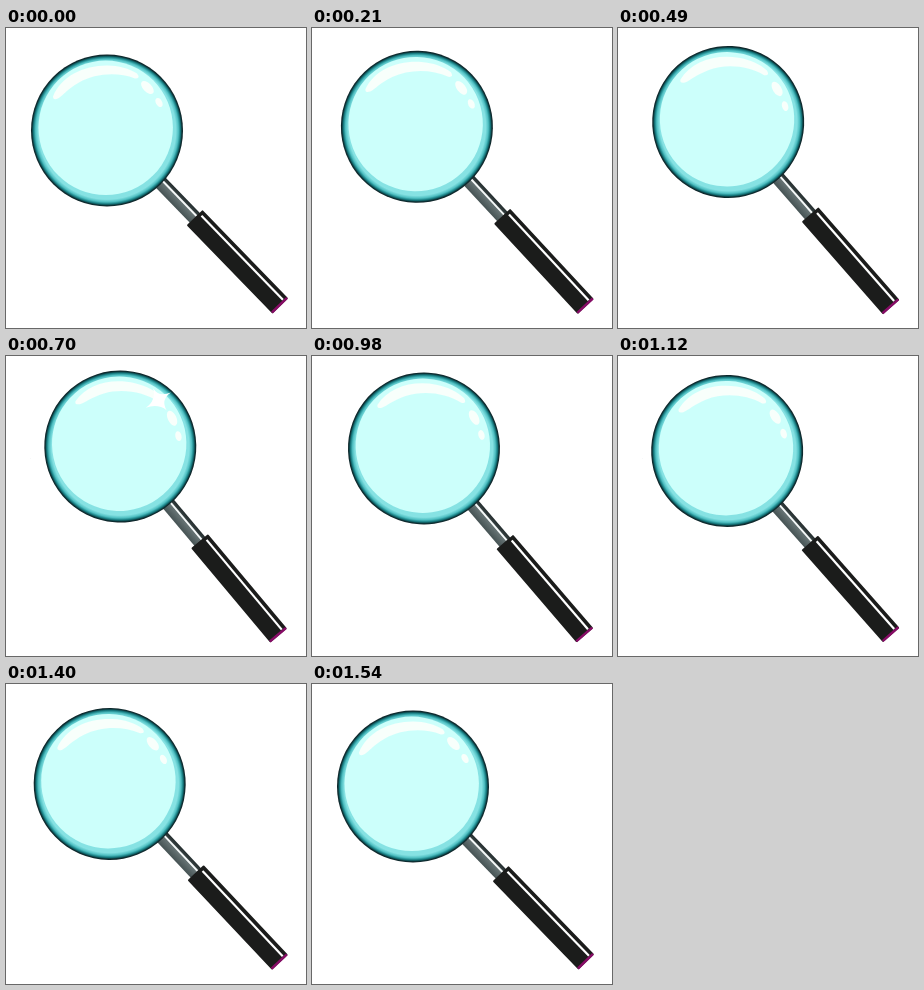
Write an HTML page that moves like this. It is 300 px wide and 300 px high and loops after 1610 ms.

```html
<!DOCTYPE html>
<html lang="en">
<head>
<meta charset="utf-8">
<title>Magnifying glass</title>
<style>
  @property --tilt { syntax: "<number>"; inherits: true; initial-value: 0; }
  @property --glint { syntax: "<number>"; inherits: true; initial-value: 0; }

  html, body { margin: 0; width: 100%; height: 100%; overflow: hidden; background: #fff; }
  svg { display: block; width: 100%; height: 100%; }

  #glass {
    transform-origin: 272.9px 279.9px;
    transform: rotate(calc(var(--tilt) * 4.15deg));
    animation: swing 1610ms infinite, flash 1610ms step-end infinite;
  }
  #handle { transform: translateY(calc((var(--tilt) - 1) * 2.3px)); }
  #streak { transform: rotate(calc(var(--tilt) * 9deg)); }
  #spots { transform: rotate(calc(var(--tilt) * 14deg)); }
  #star { transform: translate(34.6px, -48.6px) scale(var(--glint)); }

  /* 23 held poses of 70 ms */
  @keyframes swing {
    0% { --tilt: 0; animation-timing-function: steps(10, end); }
    43.47% { --tilt: 1; animation-timing-function: step-end; }
    47.82% { --tilt: 1.03; animation-timing-function: step-end; }
    52.17% { --tilt: 1; animation-timing-function: steps(2, end); }
    60.86% { --tilt: .83; animation-timing-function: steps(8, end); }
    95.65%, 100% { --tilt: 0; }
  }
  @keyframes flash {
    0% { --glint: 0; }
    39.13% { --glint: .5; }
    43.47% { --glint: 1; }
    47.82% { --glint: 1.1; }
    52.17% { --glint: .5; }
    56.52%, 100% { --glint: 0; }
  }
</style>
</head>
<body>
<svg viewBox="0 0 300 300">
  <defs>
    <radialGradient id="rim">
      <stop offset=".905" stop-color="#86e2e3"/>
      <stop offset=".94" stop-color="#4fbfc2"/>
      <stop offset=".968" stop-color="#14777c"/>
      <stop offset=".985" stop-color="#0d3438"/>
      <stop offset="1" stop-color="#0c1e22"/>
    </radialGradient>
    <linearGradient id="steel" x1="0" y1="0" x2="0" y2="1">
      <stop offset="0" stop-color="#222b2c"/>
      <stop offset=".3" stop-color="#3c4748"/>
      <stop offset=".45" stop-color="#647172"/>
      <stop offset="1" stop-color="#465354"/>
    </linearGradient>
  </defs>

  <g id="glass">
    <g transform="translate(101 102.5) rotate(45.9)">
      <g id="handle">
        <rect x="72" y="-7" width="54" height="14" fill="url(#steel)"/>
        <path d="M74-2.5H124" stroke="#f4f8f8" stroke-width="2"/>
        <rect x="123.5" y="-11" width="123" height="22" rx="1" fill="#1b1c1b"/>
        <path d="M245.5-10.5V10.5" stroke="#870c66" stroke-width="2.5"/>
        <path d="M127-6.2H244" stroke="#fff" stroke-width="2.2"/>
      </g>
    </g>

    <g transform="translate(101 102.5)">
      <circle r="76" fill="url(#rim)"/>
      <circle r="67.2" cx="-1.3" cy="-2.7" fill="#ccfffb"/>
      <g fill="#f8fffb">
        <path id="streak" d="M-54-34C-46-54-24-65 0-65C12-65 22-62 30-57Q34-52 28-52C10-59-12-57-28-48C-40-41-44-35-49-32Q-54-30-54-34Z"/>
        <g id="spots">
          <ellipse rx="8" ry="4.3" transform="translate(40.4 -43) rotate(46)"/>
          <ellipse rx="5" ry="3.1" transform="translate(52 -28) rotate(60)"/>
        </g>
        <path id="star" fill="#fff" d="M12-9Q2-1 9 9Q0 3-12 8Q-2 0-6-12Q0-3 12-9Z"/>
      </g>
    </g>
  </g>
</svg>
</body>
</html>
```
